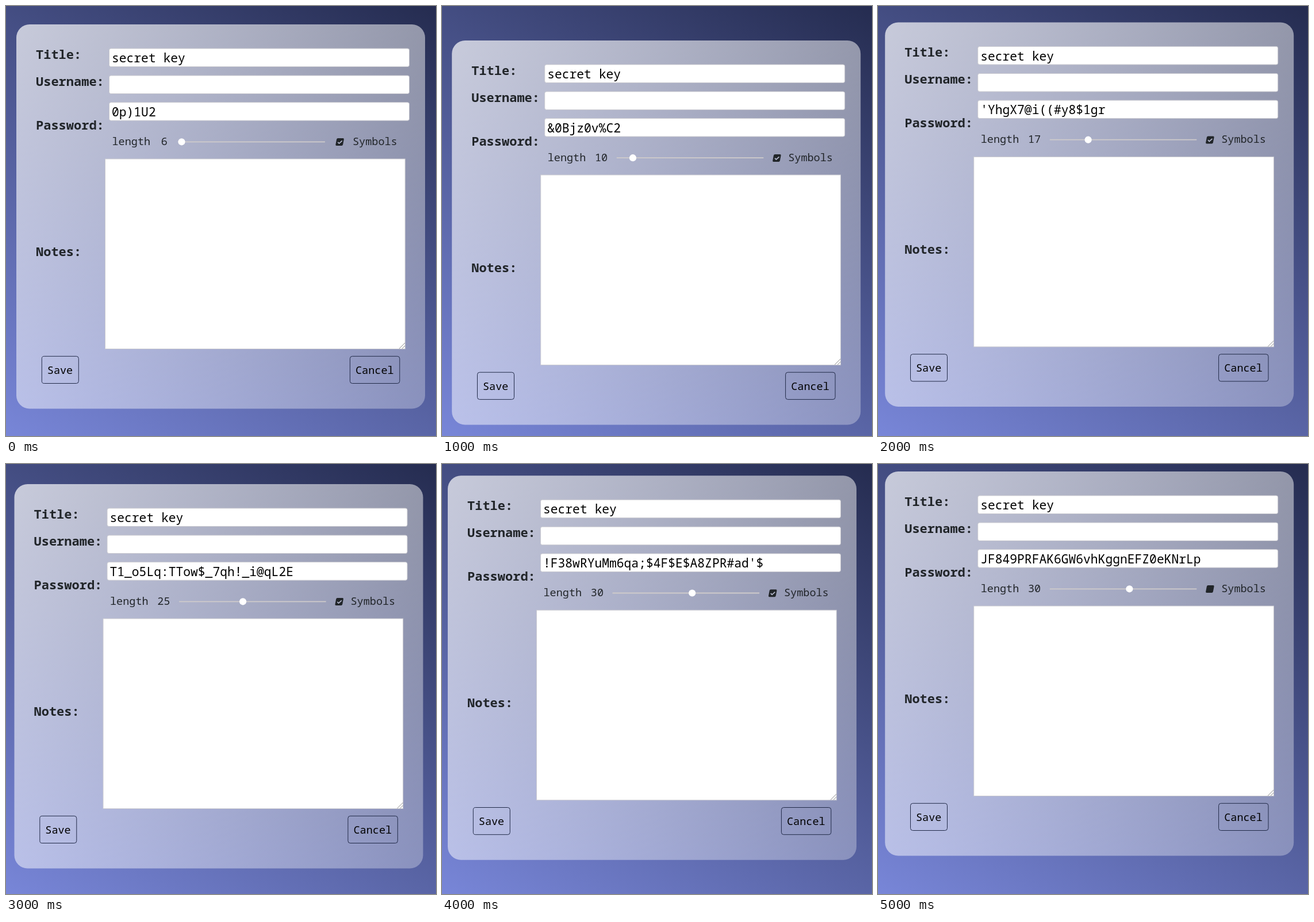
These frames come from a looping animation (748 by 748 pixels, 6 s). An HTML page:

```html
<!DOCTYPE html>
<html lang="en">
<head>
<meta charset="utf-8">
<title>Password form</title>
<style>
  html, body { margin: 0; width: 100%; height: 100%; overflow: hidden; }
  body { background: linear-gradient(30deg, #7886d8, #252c50); }
  svg { display: block; width: 100vw; height: 100vh; }
  text { font-family: "Noto Sans Mono", "DejaVu Sans Mono", monospace; white-space: pre; }
  .label { font-size: 22px; font-weight: 600; fill: #212529; }
  .value { font-size: 21.3px; fill: #000; }
  .small { font-size: 18.5px; fill: #212529; }
  .button text { font-size: 18.5px; fill: #000; }
  .button rect { fill: none; stroke: #212a48; }
  .field { fill: #fff; stroke: #c9c9cf; }
  .grip { stroke: #8c8c8c; fill: none; }
</style>
</head>
<body>
<svg viewBox="0 0 748 748">
  <defs>
    <linearGradient id="glass" x1="0" y1="0" x2="1" y2="1">
      <stop offset="0" stop-color="#fff" stop-opacity=".7"/>
      <stop offset="1" stop-color="#fff" stop-opacity=".3"/>
    </linearGradient>
  </defs>
  <g id="form">
    <rect x="18" y="32" width="711" height="668.5" rx="23" fill="url(#glass)"/>

    <g class="label">
      <text x="52" y="92">Title:</text>
      <text x="52" y="139">Username:</text>
      <text x="52" y="215">Password:</text>
      <text x="52" y="435">Notes:</text>
    </g>

    <g class="field">
      <rect x="179.5" y="74" width="522" height="31.5" rx="3"/>
      <rect x="179.5" y="121" width="522" height="31.5" rx="3"/>
      <rect x="179.5" y="167.7" width="522" height="31.5" rx="3"/>
      <rect x="172.5" y="266" width="521.7" height="330.5"/>
    </g>
    <path class="grip" d="M684 596l10-10M689 596l5-5"/>
    <text class="value" x="184" y="98.3">secret key</text>
    <text class="value" x="184" y="191.8" id="password"></text>

    <g class="small">
      <text x="184.5" y="242">length</text>
      <text y="242" id="length"></text>
      <text x="603" y="242">Symbols</text>
    </g>
    <g id="slider">
      <path d="M0 236.3h255.5" stroke="#cfcbcb" stroke-width="1.8"/>
      <circle id="thumb" cy="236.3" r="6.1" fill="#fff"/>
    </g>
    <g id="box">
      <path d="M4.5 230h8.7q2 0 1.6 2l-1.7 9q-.4 2-2.4 2h-8.7q-2 0-1.6-2l1.7-9q.4-2 2.4-2z" fill="#212529"/>
      <path id="tick" d="M4.2 236.8l2.3 2.3 5.2-4.7" fill="none" stroke="#b2b6ca" stroke-width="1.8"/>
    </g>

    <g class="button">
      <rect x="62.3" y="609.3" width="64" height="47.2" rx="4"/>
      <text x="71.8" y="640">Save</text>
      <rect x="598.4" y="609.3" width="86.4" height="47.2" rx="4"/>
      <text x="608" y="640">Cancel</text>
    </g>
  </g>
</svg>
<script>
  const STEP = 1000;
  const states = [
    { x: 0, y: 0, password: "0p)1U2", symbols: true },
    { x: -0.8, y: 27.9, password: "&0Bjz0v%C2", symbols: true },
    { x: -5.8, y: -3.6, password: "'YhgX7@i((#y8$1gr", symbols: true },
    { x: -3.5, y: 3, password: "T1_o5Lq:TTow$_7qh!_i@qL2E", symbols: true },
    { x: -8, y: -11.8, password: "!F38wRYuMm6qa;$4F$E$A8ZPR#ad'$", symbols: true },
    { x: -5.8, y: -19, password: "JF849PRFAK6GW6vhKggnEFZ0eKNrLp", symbols: false }
  ];
  const el = id => document.getElementById(id);
  const move = (id, x, y = 0) => el(id).setAttribute("transform", `translate(${x} ${y})`);
  let shown = -1;

  function show({ x, y, password, symbols }) {
    const count = password.length;
    const wide = count > 9;
    move("form", x, y);
    el("password").textContent = password;
    el("length").textContent = count;
    el("length").setAttribute("x", wide ? 266.8 : 269.8);
    // A two-digit length pushes the slider and checkbox to the right.
    move("slider", wide ? 304.6 : 299.4);
    el("thumb").setAttribute("cx", 6.1 + (count - 6) * 5.52);
    move("box", wide ? 575.6 : 573);
    el("tick").style.display = symbols ? "" : "none";
  }

  function tick() {
    const index = Math.floor(performance.now() / STEP) % states.length;
    if (index !== shown) show(states[shown = index]);
    requestAnimationFrame(tick);
  }
  tick();
</script>
</body>
</html>
```
